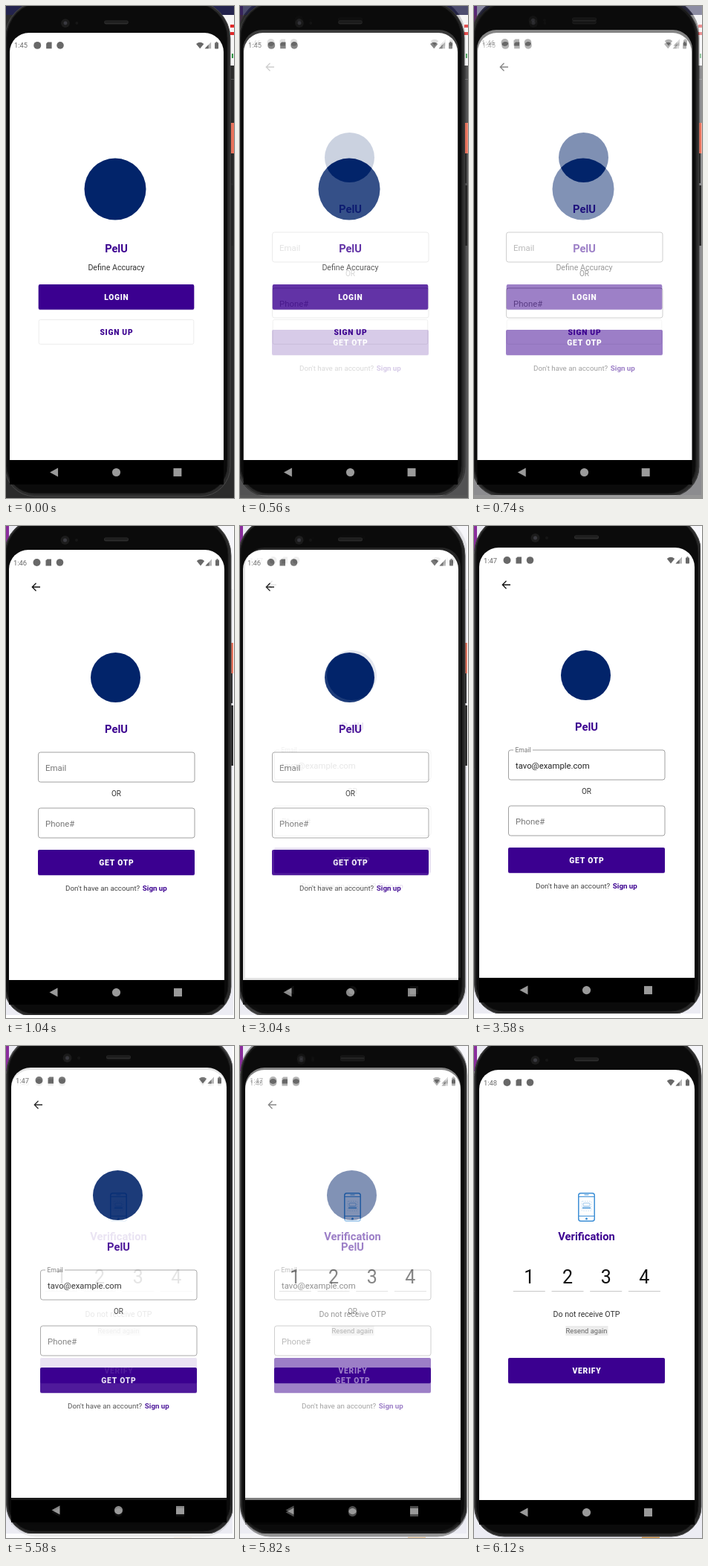
Recreate the animation shown at these times as an HTML page with a canvas. Size 307 px wide and 661 px high, loop 8 s.

```html
<!DOCTYPE html>
<html lang="en">
<head>
<meta charset="utf-8">
<title>Sign-in flow</title>
<style>
html, body { margin: 0; width: 100%; height: 100%; overflow: hidden; background: #fff; }
canvas { display: block; width: 307px; height: 661px; }
</style>
</head>
<body>
<canvas id="stage"></canvas>
<script>
const W = 307, H = 661, LOOP = 8000, STEP = 60;
const PURPLE = '#3b0090', NAVY = '#02246a', GREY = '#686868';
const BRAND = 'PelU', EMAIL = 'tavo@example.com';
const SCREEN = { x: 4, y: 32, w: 290, h: 578 };
const dpr = window.devicePixelRatio || 1;
let g;

function makeCanvas(c) {
  c.width = Math.round(W * dpr);
  c.height = Math.round(H * dpr);
  const ctx = c.getContext('2d');
  ctx.scale(dpr, dpr);
  return ctx;
}

function rect(x, y, w, h, fill) {
  g.fillStyle = fill;
  g.fillRect(x, y, w, h);
}

function round(x, y, w, h, r, fill, stroke, lw = 1) {
  g.beginPath();
  g.roundRect(x, y, w, h, r);
  if (fill) { g.fillStyle = fill; g.fill(); }
  if (stroke) { g.strokeStyle = stroke; g.lineWidth = lw; g.stroke(); }
}

function disc(x, y, r, fill) {
  g.beginPath();
  g.arc(x, y, r, 0, Math.PI * 2);
  g.fillStyle = fill;
  g.fill();
}

function poly(points, fill) {
  g.beginPath();
  points.forEach(([x, y]) => g.lineTo(x, y));
  g.closePath();
  g.fillStyle = fill;
  g.fill();
}

function text(s, x, y, size, color, { weight = 400, align = 'center', gap = 0 } = {}) {
  g.font = `${weight} ${size}px Roboto, sans-serif`;
  g.textAlign = align;
  g.letterSpacing = gap + 'px';
  g.fillStyle = color;
  g.fillText(s, x + (align === 'center' ? gap / 2 : 0), y);
}

const title = (s, y) => text(s, 148.5, y, 14.7, PURPLE, { weight: 700 });

function button(label, y, solid = true) {
  if (solid) {
    round(43, y + 0.7, 211, 34, 2, 'rgba(59,0,144,.3)');
    round(43, y, 211, 34, 2, PURPLE);
  } else {
    round(43.5, y + 0.5, 210, 33, 2, '#fff', '#ececec');
  }
  text(label, 148.5, y + 21, 10.3, solid ? '#fff' : PURPLE, { weight: 900, gap: 0.75 });
}

function field(y, hint, value) {
  round(43.5, y + 0.5, 210.5, 40, 3, '#fff', '#a0a0a0');
  const left = { align: 'left' };
  if (value) {
    rect(50, y - 1, 26, 3, '#fff');
    text(hint, 52.5, y + 3.5, 8.5, '#777', left);
    text(value, 53, y + 25, 11.3, '#222', left);
  } else {
    text(hint, 53, y + 25, 11.4, '#777', left);
  }
}

function statusBar(time, y) {
  text(time, 10, y + 3.5, 9.4, GREY, { align: 'left' });
  disc(41.5, y, 5, GREY);
  poly([[55.5, y - 4.5], [61, y - 4.5], [61, y + 4.5], [53.5, y + 4.5], [53.5, y - 2.5]], GREY);
  disc(72.5, y, 4.8, GREY);
  g.beginPath();
  g.moveTo(262, y + 4.5);
  g.lineTo(256.8, y - 2);
  g.quadraticCurveTo(262, y - 6.3, 267.2, y - 2);
  g.closePath();
  g.fillStyle = GREY;
  g.fill();
  poly([[268.5, y + 4.5], [277, y + 4.5], [277, y - 4.5]], '#b4b4b4');
  poly([[268.5, y + 4.5], [273.5, y + 4.5], [273.5, y - 0.8]], GREY);
  round(282, y - 3.6, 5, 8.2, 0.8, GREY);
  rect(283.5, y - 4.8, 2, 1.5, GREY);
}

function navBar(y) {
  const c = '#9a9a9a';
  rect(SCREEN.x, SCREEN.y + SCREEN.h, SCREEN.w, 33, '#000');
  poly([[58.5, y], [69.5, y - 6], [69.5, y + 6]], c);
  disc(148.5, y, 5.6, c);
  rect(226, y - 5.5, 11, 11, c);
}

function phone(time) {
  const { x, y, w, h } = SCREEN;
  round(-2.5, -11.5, 305.5, 670.5, [51, 51, 40, 40], '#2a2a2a', '#484848');
  round(0, -9, 299, 664, [48, 48, 37, 37], '#0b0b0b', '#181818');
  round(x, y, w, h, [26, 26, 0, 0], '#fff');

  round(132, 15.5, 33, 5, 2.5, '#2c2c2c');
  round(133, 16.5, 31, 2, 1, '#1b1b1b');
  disc(79.5, 19, 6, '#1c1c1c');
  disc(79.5, 19, 2.5, '#3a3a40');
  disc(95, 19, 2, '#161616');

  statusBar(time, 49);
  navBar(626.6);
}

function sideKeys() {
  rect(303, 157, 4, 41, '#e8735c');
  rect(303, 198, 2, 40, '#262626');
  rect(303, 241, 3, 81, '#262626');
}

function darkDesk() {
  rect(0, 0, W, H, '#2b2b2b');
  rect(0, 0, W, 12, '#23234c');
  rect(290, 12, 17, 68, '#f6f6f6');
  rect(302, 25, 5, 4, '#e02828');
  rect(302, 35, 5, 4, '#e02828');
  rect(304, 64, 2, 6, '#2c9440');
  rect(303, 98, 4, 1, '#555');
  sideKeys();
}

function lightDesk() {
  rect(0, 0, W, H, '#ececf3');
  rect(270, 0, 37, 85, '#f6f6fa');
  rect(0, 0, 4, 34, '#8a2c9c');
}

function loginDesk() {
  lightDesk();
  sideKeys();
}

function verifyDesk() {
  lightDesk();
  rect(226, 659.5, 24, 2, '#e0a050');
}

function arrow() {
  g.strokeStyle = '#111';
  g.lineWidth = 1.3;
  g.beginPath();
  g.moveTo(46, 82);
  g.lineTo(35.5, 82);
  g.moveTo(40.5, 76.8);
  g.lineTo(35.3, 82);
  g.lineTo(40.5, 87.2);
  g.stroke();
}

function welcome() {
  phone('1:45');
  disc(147, 243.5, 41.8, NAVY);
  title(BRAND, 329);
  text('Define Accuracy', 148.5, 353.2, 10.7, '#333');
  button('LOGIN', 372.4);
  button('SIGN UP', 419.7, false);
}

function login(time, value) {
  phone(time);
  arrow();
  disc(147.5, 203.5, 33.5, NAVY);
  title(BRAND, 277.5);
  field(303.5, 'Email', value);
  text('OR', 148.5, 363, 10, '#333');
  field(378.5, 'Phone#');
  button('GET OTP', 435);
  text("Don't have an account?", 80, 489.5, 9.8, '#444', { align: 'left' });
  text('Sign up', 183.8, 489.5, 9.75, PURPLE, { align: 'left', weight: 700 });
}

function deviceIcon() {
  const blue = '#3d8fd6', pale = '#8fbfe8';
  round(137.8, 197.8, 21.4, 37.4, 3, '#fff', blue, 1.5);
  rect(138, 202, 21, 1, blue);
  rect(138, 228, 21, 1, blue);
  rect(145.5, 199.5, 6, 1, blue);
  disc(148.5, 232, 1.5, blue);
  g.setLineDash([1.5, 1.5]);
  round(142, 208.5, 13, 13, 1, null, '#b8d7f1', 0.8);
  g.setLineDash([]);
  round(144, 211, 9, 4, 1, null, pale, 0.9);
  rect(143, 216, 11, 3, pale);
}

function verify() {
  phone('1:48');
  deviceIcon();
  title('Verification', 261);
  for (let i = 0; i < 4; i++) {
    const x = 71.3 + i * 51.7;
    text(String(i + 1), x, 319, 25, '#111');
    rect(x - 21.5, 329, 43, 1, '#c8c8c8');
  }
  text('Do not receive OTP', 148.5, 364, 10.6, '#333');
  rect(120.5, 376, 57, 13, '#ececec');
  text('Resend again', 148.5, 386, 9.3, '#666');
  button('VERIFY', 419);
}

// x, y: where the phone screen's top left corner lands; w, h: visible area
function render(desk, draw, { x = SCREEN.x, y = SCREEN.y, zoom = 1, w = W, h = H } = {}) {
  const c = document.createElement('canvas');
  g = makeCanvas(c);
  rect(0, 0, W, H, '#fff');
  g.beginPath();
  g.rect(0, 0, w, h);
  g.clip();
  desk();
  g.translate(x, y);
  g.scale(zoom, zoom);
  g.translate(-SCREEN.x, -SCREEN.y);
  draw();
  return c;
}

const scenes = [
  { at: 0, pic: render(darkDesk, welcome, { x: 5, y: 36, zoom: 288 / 290 }) },
  { at: 500, pic: render(loginDesk, () => login('1:46'), { w: 306, h: 657 }) },
  { at: 3040, pic: render(lightDesk, () => login('1:47', EMAIL), { x: 7, y: 29, w: 305, h: 655 }) },
  { at: 5580, pic: render(verifyDesk, verify, { x: 7 }) }
];

const view = makeCanvas(document.getElementById('stage'));
const start = performance.now();

function paint(now) {
  const t = Math.max(0, now - start) % LOOP;
  scenes.forEach(({ at, pic }, i) => {
    if (t < at) return;
    // each dissolve advances in ten equal steps
    view.globalAlpha = i ? Math.min(10, Math.floor((t - at) / STEP) + 1) / 10 : 1;
    view.drawImage(pic, 0, 0, W, H);
  });
  requestAnimationFrame(paint);
}
paint(start);
</script>
</body>
</html>
```
